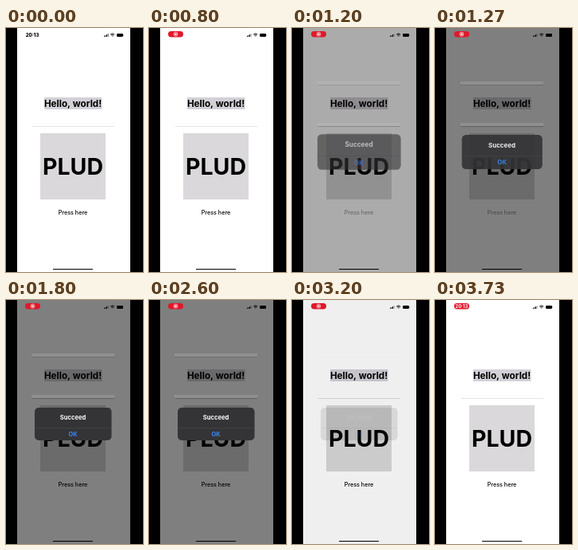
An HTML page with a canvas that plays this animation: 172x306 px, repeating every 3.87 s.

```html
<!DOCTYPE html>
<html lang="en">
<head>
<meta charset="utf-8">
<title>Alert demo</title>
<style>
html, body { margin: 0; width: 100%; height: 100%; overflow: hidden; background: #000; }
canvas { display: block; width: 172px; height: 306px; }
</style>
</head>
<body>
<canvas id="stage" width="172" height="306"></canvas>
<script>
const LOOP = 3870;
const CENTER = 84;
const FONT = 'Inter, "Liberation Sans", sans-serif';
const ctx = document.getElementById('stage').getContext('2d');

const progress = (t, from, to) => Math.min(1, Math.max(0, (t - from) / (to - from)));

function box(x, y, w, h, color, radius = 0) {
  ctx.fillStyle = color;
  ctx.beginPath();
  ctx.roundRect(x, y, w, h, radius);
  ctx.fill();
}

function label(text, x, baseline, size, weight, color) {
  ctx.font = `${weight} ${size}px ${FONT}`;
  ctx.textAlign = 'center';
  ctx.fillStyle = color;
  ctx.fillText(text, x, baseline);
}

function withAlpha(alpha, draw) {
  if (alpha <= 0) return;
  ctx.save();
  ctx.globalAlpha *= alpha;
  draw();
  ctx.restore();
}

function drawPage(pressAlpha) {
  box(14, 0, 142, 306, '#fff');
  box(48, 87, 72.5, 15, '#d3d1d7');
  label('Hello, world!', CENTER, 99, 11.7, 700, '#000');
  box(33, 123, 103, 1, '#e2e2e2');
  box(43, 132, 82, 83, '#dad8da');
  label('PLUD', CENTER, 184, 28.5, 700, '#000');
  withAlpha(pressAlpha, () => label('Press here', CENTER, 234, 7.2, 500, '#000'));
}

function drawDim(amount) {
  withAlpha(amount * 0.5, () => box(14, 0, 142, 306, '#000'));
  withAlpha(amount, () => {
    for (const y of [67, 119]) {
      box(32, y, 104, 4, 'rgba(255,255,255,.12)');
      box(32, y + 4, 104, 1, 'rgba(0,0,0,.15)');
    }
  });
}

function drawAlert(alpha, scale) {
  withAlpha(alpha, () => {
    ctx.translate(CENTER, 155.5);
    ctx.scale(scale, scale);
    ctx.translate(-CENTER, -155.5);
    box(36, 135, 96.5, 41, '#343436', 5);
    box(36, 160, 96.5, 0.6, '#4c4c4f');
    label('Succeed', CENTER, 149.8, 7.6, 700, '#fff');
    label('OK', CENTER, 170.7, 7.4, 700, '#3b86f8');
  });
}

function drawWifi(x, y) {
  ctx.strokeStyle = '#000';
  ctx.lineWidth = 0.9;
  for (const r of [0.8, 2.2, 3.7]) {
    ctx.beginPath();
    ctx.arc(x, y, r, -Math.PI * 0.75, -Math.PI * 0.25);
    ctx.stroke();
  }
}

function drawStatus(pill, icon, weakSignal) {
  withAlpha(1 - pill, () => label('20:13', 33, 11, 6, 800, '#000'));
  withAlpha(pill, () => {
    box(24, 4, 19, 7.5, '#e0182a', 3.7);
    withAlpha(1 - icon, () => label('20:13', 33.4, 10, 5.8, 700, '#fff'));
    withAlpha(icon, () => {
      ctx.strokeStyle = '#fff';
      ctx.lineWidth = 0.7;
      ctx.beginPath();
      ctx.arc(33.5, 7.7, 2.4, 0, Math.PI * 2);
      ctx.stroke();
      box(32.3, 6.5, 2.4, 2.4, '#fff', 1.2);
    });
  });
  for (let i = 0; i < 4; i++) {
    const h = 1.2 + i * 0.9;
    withAlpha(i === 3 ? 0.6 - 0.3 * weakSignal : 1,
      () => box(123 + i * 1.6, 11 - h, 1, h, '#000'));
  }
  drawWifi(133.7, 10.8);
  box(139, 7, 8, 4, '#000', 1.2);
  box(147.5, 8.2, 0.6, 1.5, '#777');
}

function draw(t) {
  const opening = progress(t, 1070, 1600);
  const closing = (1 - progress(t, 3000, 3400)) ** 3;
  const pressed = progress(t, 860, 960) * (1 - progress(t, 1270, 1600));

  ctx.clearRect(0, 0, 172, 306);
  drawPage(1 - 0.6 * pressed);
  drawDim(progress(t, 1070, 1270) * closing);
  drawAlert(progress(t, 1070, 1290) * closing, 1 + 0.2 * (1 - opening) ** 3);
  drawStatus(
    progress(t, 50, 300),
    progress(t, 300, 530) * (1 - progress(t, 3500, 3740)),
    progress(t, 300, 530)
  );
  box(59, 302, 50, 1, '#000');
}

function tick() {
  draw(performance.now() % LOOP);
  requestAnimationFrame(tick);
}
tick();
</script>
</body>
</html>
```
